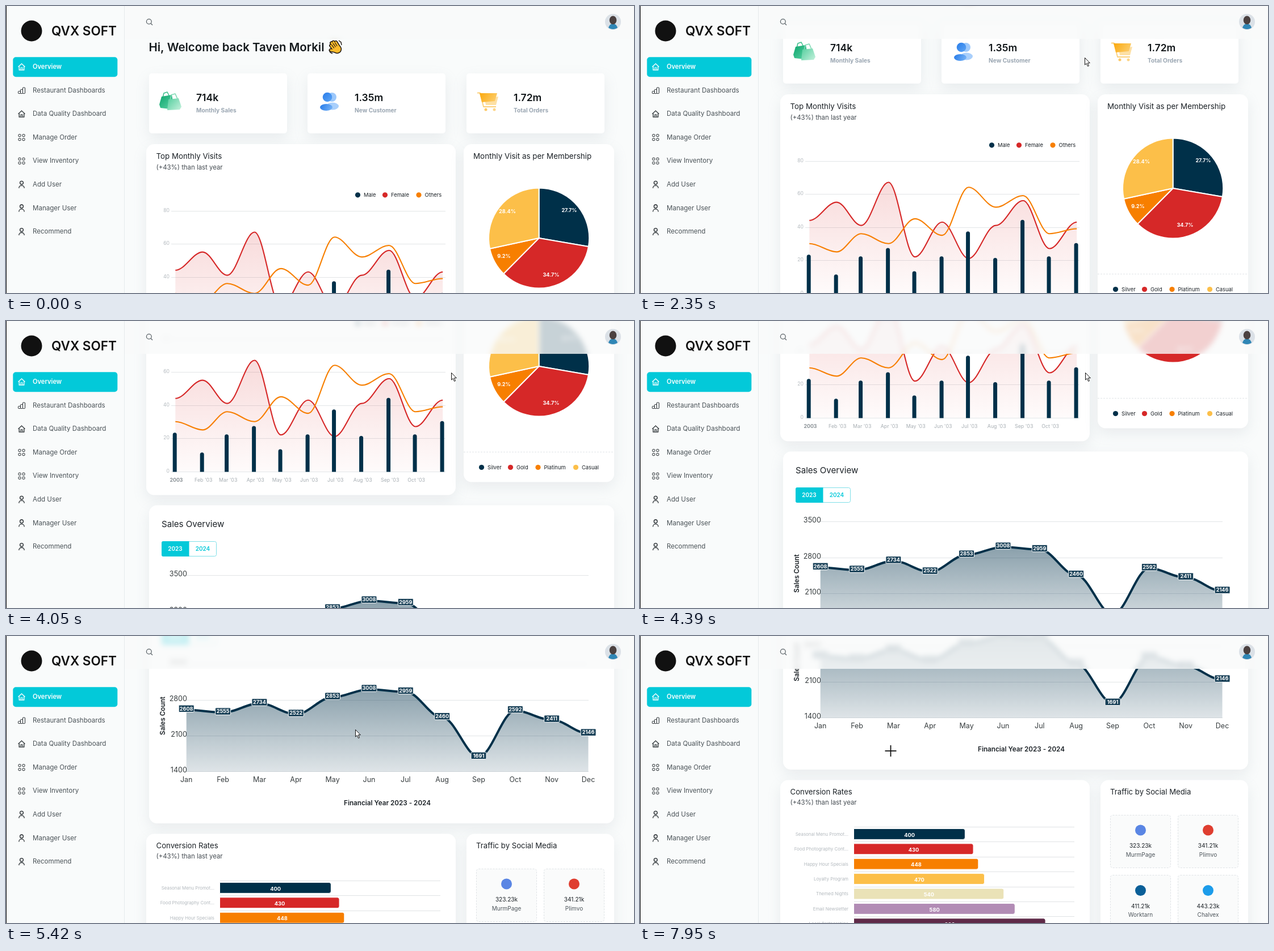
An HTML page with a canvas for the animation above (8000 ms loop, 1106 px wide and 507 px high).

```html
<!DOCTYPE html>
<html lang="en">
<head>
<meta charset="utf-8">
<title>Dashboard</title>
<style>
  html, body { margin: 0; width: 100%; height: 100%; overflow: hidden; background: #f9fbfb; }
  canvas { display: block; width: 1106px; height: 507px; }
</style>
</head>
<body>
<canvas id="stage" width="1106" height="507"></canvas>
<script>
const W = 1106, H = 507, LOOP = 8000, STEP = 70;
const BG = '#f9fbfb', NAVY = '#003049', RED = '#d62828', ORANGE = '#f77f00', YELLOW = '#fcbf49';
const CYAN = '#03c9d9', INK = '#1b2126', GRID = '#e2e5e7', MUTED = '#b3b9be';
const stage = document.getElementById('stage').getContext('2d');
let g;

// ---------- drawing helpers (all draw on g) ----------
function layer(h, paint) {
  const c = document.createElement('canvas');
  c.width = W;
  c.height = h;
  g = c.getContext('2d');
  paint();
  return c;
}

// y is the middle of the capital letters
function text(str, x, y, size, color = INK, weight = 400, align = 'left') {
  g.font = `${weight} ${size}px Inter, "Open Sans", sans-serif`;
  g.fillStyle = color;
  g.textAlign = align;
  g.fillText(str, x, y + size * 0.36);
}

function line(points, color, width = 1, dash = []) {
  g.beginPath();
  points.forEach(([x, y], i) => i ? g.lineTo(x, y) : g.moveTo(x, y));
  g.strokeStyle = color;
  g.lineWidth = width;
  g.setLineDash(dash);
  g.stroke();
  g.setLineDash([]);
}

function poly(points, fill) {
  g.beginPath();
  points.forEach(([x, y]) => g.lineTo(x, y));
  g.closePath();
  g.fillStyle = fill;
  g.fill();
}

function oval(x, y, rx, ry, fill) {
  g.beginPath();
  g.ellipse(x, y, rx, ry, 0, 0, 7);
  g.fillStyle = fill;
  g.fill();
}

const dot = (x, y, r, fill) => oval(x, y, r, r, fill);

function box(x, y, w, h, r, fill, stroke, dash = []) {
  g.beginPath();
  g.roundRect(x, y, w, h, r);
  if (fill) { g.fillStyle = fill; g.fill(); }
  if (stroke) {
    g.strokeStyle = stroke;
    g.lineWidth = 1;
    g.setLineDash(dash);
    g.stroke();
    g.setLineDash([]);
  }
}

function fade(x0, y0, x1, y1, a, b) {
  const f = g.createLinearGradient(x0, y0, x1, y1);
  f.addColorStop(0, a);
  f.addColorStop(1, b);
  return f;
}

function card(x, y, w, h, r) {
  g.save();
  g.shadowColor = 'rgba(145,158,171,.16)';
  g.shadowBlur = 24;
  g.shadowOffsetY = 9;
  box(x, y, w, h, r, '#fff');
  g.restore();
}

// smooth line with a level tangent at every point
function curve(points) {
  g.beginPath();
  g.moveTo(...points[0]);
  for (let i = 1; i < points.length; i++) {
    const [x0, y0] = points[i - 1], [x1, y1] = points[i], d = (x1 - x0) * 0.35;
    g.bezierCurveTo(x0 + d, y0, x1 - d, y1, x1, y1);
  }
}

function strokeCurve(points, color, width) {
  curve(points);
  g.strokeStyle = color;
  g.lineWidth = width;
  g.stroke();
}

function fillCurve(points, base, fill) {
  curve(points);
  g.lineTo(points[points.length - 1][0], base);
  g.lineTo(points[0][0], base);
  g.fillStyle = fill;
  g.fill();
}

function legend(items, y) {
  for (const [x, label, color] of items) {
    dot(x, y, 4.6, color);
    text(label, x + 10.5, y, 9.4);
  }
}

// ---------- scrolling page ----------
function wave(x, y) {
  g.save();
  g.translate(x, y);
  g.rotate(-0.6);
  g.scale(1.08, 1.08);
  g.lineCap = 'round';
  const fingers = [[-4.6, -6], [-1.4, -9], [2, -8.5], [5.2, -6]];
  for (const [color, extra] of [['#1f1812', 2.8], ['#fdbb2c', 0]]) {
    for (const [fx, fy] of fingers) line([[fx * 0.9, 3], [fx, fy]], color, 3 + extra);
    line([[-3, 6], [-9, 0]], color, 3.2 + extra);
    oval(0.5, 4.5, 6 + extra / 2, 6 + extra / 2, color);
  }
  for (const fx of [-2.9, 0.4, 3.6]) line([[fx, -6], [fx * 0.9, 0]], '#1f1812', 1);
  g.restore();
  g.lineCap = 'butt';
  line([[586, 61], [590, 64], [591, 69]], '#1f1812', 1.4);
  line([[569, 77], [571, 82], [575, 84]], '#1f1812', 1.4);
}

function bags() {
  g.lineJoin = 'round';
  line([[276, 162], [278, 154], [284, 152], [288, 160]], '#3fbf8d', 1.6);
  poly([[274, 160], [292, 157], [297, 183], [272, 180], [270, 174]], fade(272, 158, 295, 182, '#11a870', '#5fd3a6'));
  line([[289, 166], [291, 157], [298, 155], [302, 164]], '#7fd9b4', 1.6);
  poly([[286, 165], [304, 163], [309, 178], [306, 183], [284, 184]], fade(286, 164, 308, 184, '#5cd0a2', '#c4f1dc'));
}

function people() {
  dot(574, 161, 8, '#9cc8fb');
  dot(566, 161, 8.3, fade(558, 153, 574, 169, '#2a7de9', '#5ba4f5'));
  oval(575, 177, 11, 6.5, '#a9cffb');
  oval(564, 179, 11, 6, fade(554, 174, 575, 184, '#2a7de9', '#7ab6f8'));
}

function cart() {
  line([[830, 153.5], [835, 153.5], [841, 178], [863, 178]], '#fbcf78', 1.8);
  poly([[843, 164], [867, 160], [863, 175], [845, 175]], '#fde0a4');
  poly([[834, 154], [865, 154], [861, 168], [838, 170]], fade(836, 154, 862, 170, '#fbab12', '#fccd6c'));
  dot(845, 183, 2.5, '#fcc966');
  dot(860, 183, 2.5, '#fcd588');
}

function stats() {
  const items = [[252, '714k', 'Monthly Sales'], [531, '1.35m', 'New Customer'], [811, '1.72m', 'Total Orders']];
  for (const [x, value, label] of items) {
    card(x, 119, 243, 106, 5);
    text(value, x + 83, 162, 17.5, '#111619', 600);
    text(label, x + 83, 184, 10.2, '#9aa6b2', 700);
  }
  bags();
  people();
  cart();
}

function visits() {
  card(247, 244, 545, 393.5, 14);
  text('Top Monthly Visits', 264.5, 265, 13.3);
  text('(+43%) than last year', 264.5, 284.5, 11.4, '#454c52');
  legend([[619.5, 'Male', NAVY], [667.5, 'Female', RED], [727, 'Others', ORANGE]], 333.8);

  const base = 595.5, unit = 2.925;
  for (let v = 0; v <= 80; v += 20) {
    const y = Math.round(base - v * unit) + 0.5;
    line([[291, y], [774, y]], GRID);
    text(String(v), 288, y - 2, 8.6, MUTED, 400, 'right');
  }
  const days = [0, 31, 59, 90, 120, 151, 181, 212, 243, 273, 304];
  const xs = days.map(d => 298.3 + d * 1.549);
  const plot = values => values.map((v, i) => [xs[i], base - v * unit]);
  const male = plot([23, 11, 22, 27, 13, 22, 37, 21, 44, 22, 30]);
  const female = plot([44, 55, 41, 67, 22, 43, 21, 41, 56, 27, 43]);
  const others = plot([30, 25, 36, 30, 45, 35, 64, 52, 59, 36, 39]);

  fillCurve(female, base, fade(0, 399, 0, base, 'rgba(214,40,40,.17)', 'rgba(214,40,40,.02)'));
  strokeCurve(female, RED, 2.1);
  for (const [x, y] of male) box(x - 4.6, y - 1, 7, base + 2 - y, [3.5, 3.5, 0, 0], NAVY);
  strokeCurve(others, ORANGE, 2.1);

  const months = ['Feb', 'Mar', 'Apr', 'May', 'Jun', 'Jul', 'Aug', 'Sep', 'Oct'];
  text('2003', 300, 611, 8.8, '#8b9297', 700, 'center');
  months.forEach((m, i) => text(`${m} '03`, xs[i + 1] + 1.5, 611, 8.8, '#a7aeb3', 400, 'center'));
}

function membership() {
  card(806, 244, 265, 370.5, 14);
  text('Monthly Visit as per Membership', 823, 265, 13.4);
  const cx = 938.6, cy = 410, slices = [[27.7, NAVY, 992, 361], [34.7, RED, 960, 474.5], [9.2, ORANGE, 877, 441.5], [28.4, YELLOW, 883, 363]];
  let a = -Math.PI / 2;
  g.lineJoin = 'round';
  for (const [share, color] of slices) {
    const b = a + share / 50 * Math.PI;
    g.beginPath();
    g.moveTo(cx, cy);
    g.arc(cx, cy, 88.6, a, b);
    g.closePath();
    g.fillStyle = color;
    g.fill();
    g.strokeStyle = '#fff';
    g.lineWidth = 2;
    g.stroke();
    a = b;
  }
  for (const [share, , x, y] of slices) text(share + '%', x, y, 9.1, '#fff', 700, 'center');
  line([[806, 561.5], [1071, 561.5]], '#e1e5e8', 1, [3, 2]);
  legend([[837.5, 'Silver', NAVY], [888.5, 'Gold', RED], [937, 'Platinum', ORANGE], [1003.5, 'Casual', YELLOW]], 588.5);
}

function sales() {
  card(252, 655.5, 819, 405.5, 14);
  text('Sales Overview', 274, 689, 15.1);
  box(274.5, 719.5, 96, 26, 3, '#fff', '#7fdfe8');
  box(274, 719, 48.5, 27, [3, 0, 0, 3], CYAN);
  text('2023', 298, 732.5, 10, '#fff', 600, 'center');
  text('2024', 346.5, 732.5, 10, CYAN, 600, 'center');

  const base = 969.7, x0 = 317.7, dx = 64.35;
  for (let i = 0; i < 4; i++) {
    const y = Math.floor(base - i * 63.35) + 0.5;
    line([[318, y], [1026, y]], GRID);
    text(String(1400 + i * 700), 319, y - 3.3, 12.6, '#373d3f', 400, 'right');
  }
  const counts = [2608, 2555, 2734, 2522, 2853, 3008, 2959, 2460, 1691, 2592, 2411, 2146];
  const points = counts.map((v, i) => [x0 + i * dx, base - (v - 1400) / 700 * 63.35]);
  fillCurve(points, base, fade(0, 824, 0, base, 'rgba(0,48,73,.46)', 'rgba(0,48,73,.13)'));
  strokeCurve(points, NAVY, 4);
  points.forEach(([x, y], i) => {
    box(x - 13.5, y - 8.3, 27, 12.5, 1.5, '#173f56', '#fff');
    text(String(counts[i]), x, y - 2, 9.1, '#fff', 700, 'center');
  });
  'Jan Feb Mar Apr May Jun Jul Aug Sep Oct Nov Dec'.split(' ')
    .forEach((m, i) => text(m, x0 + i * dx, 983.5, 12.5, '#373d3f', 400, 'center'));
  text('Financial Year 2023 - 2024', 671.5, 1024.5, 11.7, INK, 600, 'center');
  g.save();
  g.translate(276, 871);
  g.rotate(-Math.PI / 2);
  text('Sales Count', 0, 0, 11.7, INK, 600, 'center');
  g.restore();
}

function conversion() {
  card(247, 1079.5, 545, 400, 14);
  text('Conversion Rates', 264.5, 1100.3, 13.2);
  text('(+43%) than last year', 264.5, 1119.3, 11.4, '#454c52');
  const rows = [
    ['Seasonal Menu Promot...', 400, NAVY], ['Food Photography Cont...', 430, RED],
    ['Happy Hour Specials', 448, ORANGE], ['Loyalty Program', 470, YELLOW],
    ['Themed Nights', 540, '#eae2b7'], ['Email Newsletter', 580, '#b28cb5'],
    ['Local Partnerships', 690, '#5f2a48']
  ];
  rows.forEach(([label, value, color], i) => {
    const y = 1165.4 + i * 26.4, w = value * 0.4885;
    const top = Math.floor(y - 3) + 0.5;
    line([[377, top], [765, top]], '#e0e3e5');
    box(376.5, y, w + 0.5, 19, [0, 3.5, 3.5, 0], color, '#fff');
    text(String(value), 377 + w / 2, y + 10.8, 9.3, '#fff', 700, 'center');
    text(label, 367, y + 9.5, 7.9, MUTED, 400, 'right');
  });
}

function traffic() {
  card(811, 1079.5, 260, 400, 14);
  text('Traffic by Social Media', 828, 1100.3, 13.2);
  const tiles = [['323.23k', 'MurmPage', '#5a86e4'], ['341.21k', 'Plimvo', '#df3e30'],
    ['411.21k', 'Worktarn', '#0a5f98'], ['443.23k', 'Chalvex', '#1c9cea']];
  tiles.forEach(([value, label, color], i) => {
    const x = 828 + (i % 2) * 119, y = 1141 + (i >> 1) * 106.5, cx = x + 53.5;
    box(x + 0.5, Math.floor(y) + 0.5, 106, 93, 4, '#fafbfb', '#dfe3e6', [3, 2]);
    dot(cx, y + 27, 9.5, color);
    text(value, cx, y + 54.5, 10.1, INK, 400, 'center');
    text(label, cx, y + 70, 10, '#4d555b', 400, 'center');
  });
}

const page = layer(1340, () => {
  g.fillStyle = BG;
  g.fillRect(0, 0, W, 1340);
  text('Hi, Welcome back Taven Morkil', 251.5, 73, 20.4, '#14191c', 600);
  wave(580, 72.5);
  stats();
  visits();
  membership();
  sales();
  conversion();
  traffic();
});

// ---------- fixed sidebar and header items ----------
const icons = {
  home(x, y, color) {
    line([[x - 6, y], [x, y - 5.5], [x + 6, y]], color, 1.3);
    line([[x - 4.3, y - 1], [x - 4.3, y + 5.5], [x + 4.3, y + 5.5], [x + 4.3, y - 1]], color, 1.3);
    line([[x - 1.5, y + 5], [x - 1.5, y + 1.5], [x + 1.5, y + 1.5], [x + 1.5, y + 5]], color, 1.1);
  },
  bars(x, y, color) {
    [[-6, 4], [-2, 7], [2, 10.5]].forEach(([dx, h]) => box(x + dx, y + 5.5 - h, 4, h, 0.8, null, color));
  },
  tiles(x, y, color) {
    for (const dx of [-5.5, 1.5]) for (const dy of [-5.5, 1.5]) box(x + dx, y + dy, 4, 4, 1, null, color);
  },
  user(x, y, color) {
    g.strokeStyle = color;
    g.lineWidth = 1.3;
    g.beginPath();
    g.arc(x, y - 3, 2.9, 0, 7);
    g.stroke();
    g.beginPath();
    g.moveTo(x - 4.7, y + 6.5);
    g.bezierCurveTo(x - 4.7, y + 0.2, x + 4.7, y + 0.2, x + 4.7, y + 6.5);
    g.stroke();
  }
};

const fixed = layer(H, () => {
  g.fillStyle = BG;
  g.fillRect(0, 0, 209, H);
  line([[208.5, 0], [208.5, H]], '#e6eaec');
  g.fillStyle = '#111';
  g.fillRect(0, 0, 1, H);
  dot(45, 44, 18.5, '#111');
  text('QVX SOFT', 80, 44, 22.5, '#111', 600);

  box(12.3, 90.2, 184, 35, 5, CYAN);
  const menu = [['Overview', 'home'], ['Restaurant Dashboards', 'bars'], ['Data Quality Dashboard', 'home'],
    ['Manage Order', 'tiles'], ['View Inventory', 'tiles'], ['Add User', 'user'], ['Manager User', 'user'], ['Recommend', 'user']];
  menu.forEach(([label, icon], i) => {
    const y = 107 + i * 41.57;
    icons[icon](27.5, y + 0.5, i ? '#22282c' : '#fff');
    text(label, 47, y, i ? 11.55 : 11.1, i ? '#4a5257' : '#fff', i ? 400 : 600);
  });

  g.strokeStyle = '#5b6368';
  g.lineWidth = 1.3;
  g.beginPath();
  g.arc(251.8, 27.5, 4.4, 0, 7);
  g.stroke();
  line([[255, 30.7], [258, 33.7]], '#5b6368', 1.3);

  dot(1069, 28, 14, '#dbe1e7');
  g.save();
  g.beginPath();
  g.arc(1069, 28, 13, 0, 7);
  g.clip();
  oval(1069, 40, 8, 9, '#2f86b5');
  oval(1069, 25, 6.3, 7.5, '#4b4140');
  g.restore();
});

// ---------- motion ----------
const smooth = p => p * p * (3 - 2 * p);
const snap = p => p < 0.5 ? 4 * p ** 3 : 1 - 4 * (1 - p) ** 3;

// share of a move done at time t, in whole screen steps
function progress(t, start, steps) {
  const k = Math.floor((t - start) / STEP) + 1;
  return Math.max(0, Math.min(1, k / steps));
}

// wheel clicks: start time, number of steps
const clicks = [[1350, 3], [2350, 4], [3230, 4], [3510, 4], [4180, 3], [4390, 3], [4600, 3], [5075, 3], [5285, 3], [5490, 3]];
const CLICK = 82.5;
const scrollAt = t => Math.round(clicks.reduce((sum, [start, n]) => sum + CLICK * snap(progress(t, start, n)), 0));

// pointer moves: start time, number of steps, end point
const moves = [[110, 12, 783, 91], [3980, 1, 784, 91], [4800, 3, 615, 165], [5900, 4, 470, 215], [6700, 10, 449, 211], [7740, 4, 441.5, 203]];

function pointerAt(t) {
  let x = 1080, y = 505;
  for (const [start, n, tx, ty] of moves) {
    const p = smooth(progress(t, start, n));
    x += (tx - x) * p;
    y += (ty - y) * p;
  }
  return [x, y];
}

function drawPointer(t) {
  if (t < 110) return;
  const [x, y] = pointerAt(t);
  if (t >= 7880) {
    line([[x - 10, y], [x + 10, y]], '#111', 1.8);
    line([[x, y - 10], [x, y + 10]], '#111', 1.8);
    return;
  }
  g.save();
  g.translate(Math.round(x) + 0.5, Math.round(y) + 0.5);
  g.lineJoin = 'miter';
  poly([[0, 0], [0, 12.5], [2.8, 10], [5, 15], [7, 14.2], [4.9, 9.2], [8.8, 9.2]], '#fff');
  g.strokeStyle = '#111';
  g.lineWidth = 1;
  g.stroke();
  g.restore();
}

function drawHeader(s) {
  g.save();
  g.beginPath();
  g.rect(209, 0, W - 209, 58);
  g.clip();
  g.filter = 'blur(5px)';
  g.drawImage(page, 0, -s);
  g.filter = 'none';
  g.globalAlpha = 0.8;
  g.fillStyle = BG;
  g.fillRect(209, 0, W - 209, 58);
  g.restore();
}

function frame(now) {
  const t = now % LOOP, s = scrollAt(t);
  g = stage;
  g.drawImage(page, 0, -s);
  drawHeader(s);
  g.drawImage(fixed, 0, 0);
  drawPointer(t);
  requestAnimationFrame(frame);
}
requestAnimationFrame(frame);
</script>
</body>
</html>
```
